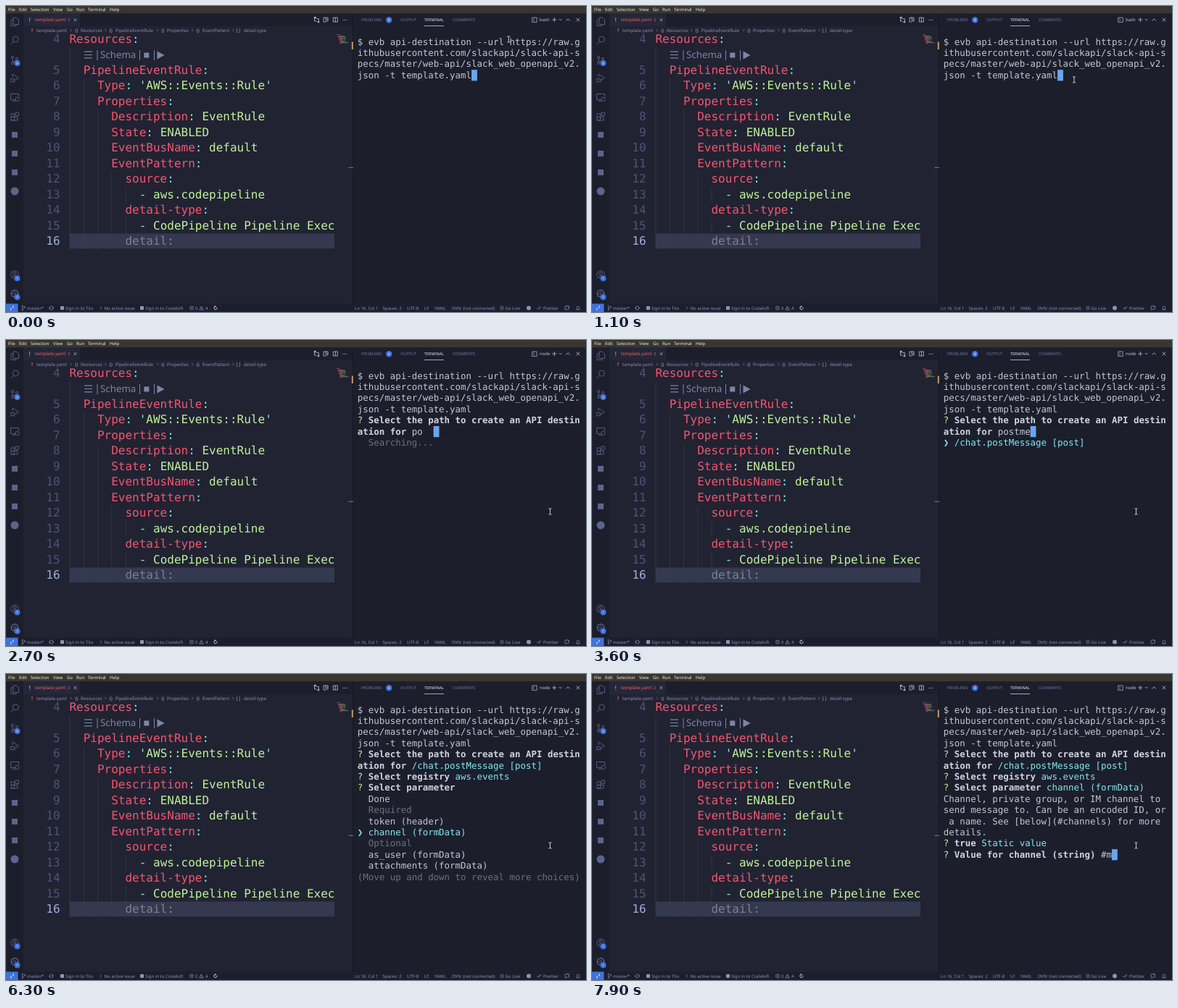
Recreate the animation shown at these times as an HTML page. Size 800 px wide and 423 px high, loop 8 s.

```html
<!DOCTYPE html>
<html lang="en">
<head>
<meta charset="utf-8">
<title>Editor and terminal</title>
<style>
  html, body { margin: 0; width: 100%; height: 100%; overflow: hidden; background: #212332; }
  svg { display: block; width: 800px; height: 423px; }
  /* the tiny turn keeps baselines from snapping to whole pixels */
  text { white-space: pre; text-rendering: geometricPrecision; transform: rotate(0.001deg); font-family: "Noto Sans", "Open Sans", sans-serif; }
  .mono { font-family: "DejaVu Sans Mono", "Liberation Mono", monospace; }
</style>
</head>
<body>
<svg id="stage" viewBox="0 0 800 423" xmlns="http://www.w3.org/2000/svg">
  <g id="chrome"></g>
  <g id="term"></g>
  <text id="shell" x="736" y="21.3" font-size="6" fill="#c3c8d8"></text>
  <path id="mouse" d="M-2 -4.2Q0 -4.2 0 -3Q0 -4.2 2 -4.2M0 -3V3M-2 4.2Q0 4.2 0 3Q0 4.2 2 4.2" fill="none" stroke="#dedee2" stroke-width="0.9"/>
</svg>
<script>
const $ = id => document.getElementById(id);
const DIM = '#5b648b', LIGHT = '#bcc3d8', BLUE = '#3e73dd', RED = '#f6546f', CYAN = '#80e9ee', GREEN = '#bff29a';
const WARN = '#ec655c';

const rect = (x, y, w, h, fill) =>
  `<rect x="${x}" y="${y}" width="${w}" height="${h}" fill="${fill}"/>`;
const dot = (x, y, r, fill) => `<circle cx="${x}" cy="${y}" r="${r}" fill="${fill}"/>`;
const line = (d, color = DIM, w = 0.9) =>
  `<path d="${d}" fill="none" stroke="${color}" stroke-width="${w}" stroke-linejoin="round"/>`;
const ring = (x, y, r, color = DIM, w = 0.9) =>
  `<circle cx="${x}" cy="${y}" r="${r}" fill="none" stroke="${color}" stroke-width="${w}"/>`;
const label = (x, y, s, fill = LIGHT, size = 6, extra = '') =>
  `<text x="${x}" y="${y}" font-size="${size}" fill="${fill}" ${extra}>${s}</text>`;
const span = (s, fill, bold) =>
  `<tspan fill="${fill}"${bold ? ' font-weight="700"' : ''}>${s}</tspan>`;
const labels = (y, fill, size, items) => items.map(([x, s]) => label(x, y, s, fill, size)).join('');

function frame() {
  return rect(0, 0, 800, 423, '#212332') +
    rect(0, 10, 800, 18, '#1c1e2c') + rect(24, 10, 78, 18, '#24273a') +
    rect(0, 10, 24, 402, '#1c1e2c') + rect(479, 10, 321, 402, '#1c1e2c') +
    rect(478, 10, 1, 402, '#151722') +
    rect(0, 411.5, 800, 11.5, '#1b1e2d') +
    rect(0, 0, 800, 10.2, '#393632');
}

function menu() {
  return labels(7.4, '#f0eeea', 6, [[3, 'File'], [18, 'Edit'], [34, 'Selection'], [65, 'View'],
    [84, 'Go'], [97, 'Run'], [113, 'Terminal'], [143, 'Help']]);
}

function tabs() {
  const crumb = '#8b92b2';
  const bracket = x => label(x, 35.8, '{}', '#a2a9c6', 6.2);
  const arrow = x => line(`M${x} 31.8l1.6 1.7l-1.6 1.7`, crumb, 0.6);
  return label(31.5, 22, '!', WARN, 8, 'font-weight="700"') + label(40, 21.4, 'template.yaml', WARN, 6.25) +
    label(85, 21.4, '2', WARN, 5.5) + line('M93.7 17.3l3.6 3.6m0-3.6l-3.6 3.6', '#c9cee0', 0.7) +
    label(35, 36, '!', WARN, 7, 'font-weight="700"') +
    labels(35.8, crumb, 6.2, [[42, 'template.yaml'], [103, 'Resources'], [151, 'PipelineEventRule'],
      [222, 'Properties'], [271, 'EventPattern'], [328, 'detail-type']]) +
    [95, 142.5, 214, 262.5].map(bracket).join('') + label(317.5, 35.8, '[ ]', '#a2a9c6', 6.2) +
    [89, 136.5, 208.5, 256.5, 312.5].map(arrow).join('') +
    line('M427 16h-1.5v5h3M429.5 22.5h1.8v-5h-3M428 15l-1.5 1.2l1.5 1.2', LIGHT, 0.8) +
    ring(426, 16, 1, LIGHT, 0.8) + ring(431, 22, 1, LIGHT, 0.8) +
    line('M438 16h6v3M438 16v6h3M441 16v3', LIGHT, 0.8) + ring(442.7, 20, 1.4, LIGHT, 0.8) +
    line('M451.3 16h6v6h-6zM454.3 16v6', LIGHT, 0.8) +
    [465, 467.3, 469.6].map(x => dot(x, 19.3, 0.6, LIGHT)).join('');
}

function sidebar() {
  const badge = (x, y, s) => dot(x, y, 4, BLUE) + label(x, y + 1.7, s, '#fff', 4.8, 'text-anchor="middle"');
  return line('M10 16h4.5l3 3v6.5H10zM10 19H7v8.5h7v-2') +
    ring(13.3, 46, 4) + line('M10.4 49l-4 4.3') +
    ring(9, 71, 1.6) + ring(9, 79, 1.6) + ring(15, 73, 1.6) + line('M9 72.6v4.8M15 74.6q0 2-6 2') + badge(15.5, 79, '9') +
    line('M9 98v-4l8.5 5.5l-6 4') + ring(9, 102.5, 2.4) + line('M5.5 100.5l1.4 1m-1.4 4l1.4-1m5.6-4l-1.4 1m1.4 4l-1.4-1') +
    line('M13 129.5H6.5v-8h11v4M9 131.5h4') + ring(15.6, 129, 2.7) +
    line('M7 149h4.5v9H7zM7 153.5h9v4.5h-9M13 147h4.5v4.5H13z') +
    rect(8, 174, 8, 8, DIM) + rect(8, 200, 8, 8, DIM) + rect(8, 226, 8, 8, DIM) + dot(12, 256, 5.5, DIM) +
    ring(12, 371.5, 5.3) + ring(12, 370, 1.9) + line('M8.5 375q3.5-4 7 0') + badge(15.5, 376.5, '1') +
    ring(12, 397.5, 4.6, DIM, 1.3) + ring(12, 397.5, 1.6) +
    line('M12 391.5v2.5M12 401v2.5M6 397.5h2.5M15.5 397.5h2.5M7.8 393.3l1.6 1.6M16.2 393.3l-1.6 1.6M7.8 401.7l1.6-1.6') +
    badge(15.5, 402.5, '1');
}

// number, indent, key, value
const CODE = [
  [4, 0, 'Resources'], null,
  [5, 2, 'PipelineEventRule'], [6, 4, 'Type', "'AWS::Events::Rule'"], [7, 4, 'Properties'],
  [8, 6, 'Description', 'EventRule'], [9, 6, 'State', 'ENABLED'], [10, 6, 'EventBusName', 'default'],
  [11, 6, 'EventPattern'], [12, 8, 'source'], [13, 10, '-', 'aws.codepipeline'],
  [14, 8, 'detail-type'], [15, 10, '-', 'CodePipeline Pipeline Exec'], [16, 8, 'detail']
];

function editor() {
  const left = 87.4, cw = 9.632, base = 50.9, pitch = 21.5;
  let out = rect(88, 314.5, 365, 20.8, '#343950');
  for (const [col, from] of [[0, 1], [2, 3], [4, 5], [6, 9]])
    out += rect(left + col * cw + 0.3, 35.4 + from * pitch, 0.7, (14 - from) * pitch, '#393d50');
  for (const r of [10, 12]) out += rect(left + 8 * cw + 0.3, 35.4 + r * pitch, 0.7, pitch, '#393d50');
  CODE.forEach((row, i) => {
    if (!row) return;
    const [num, indent, key, value = ''] = row, y = base + i * pitch, ghost = num === 16;
    out += label(74.6, y, num, ghost ? '#9fb0de' : '#4d5476', 16, 'class="mono" text-anchor="end"');
    const parts = ghost ? span(key + ':', '#7d818c')
      : (key === '-' ? span('-', CYAN) : span(key, RED) + span(':', CYAN)) +
        (value && ' ' + value.replace(/'|[^']+/g, s => span(s, s === "'" ? CYAN : GREEN)));
    out += label(left + indent * cw, y, parts, GREEN, 16, 'class="mono"');
  });
  const lens = '#7c84a8';
  out += line('M108 63.2h11M108 67.5h11M108 71.8h11', lens, 1.2) + label(130, 72, 'Schema', lens, 13.3) +
    [125.5, 184, 204].map(x => rect(x, 61, 1, 14, lens)).join('') + rect(190.3, 64.5, 7, 7, lens) +
    `<path d="M208.5 62.5L218.5 68L208.5 73.5Z" fill="${lens}"/>`;
  CODE.forEach((row, i) => {
    if (!row) return;
    const [, indent, key, value = ''] = row, x = 456 + indent * 0.5, w = key.length * 0.5;
    out += rect(x, 39 + i * 0.95, w, 0.7, '#b24e62') + rect(x + w + 0.5, 39 + i * 0.95, value.length * 0.4, 0.7, '#8aa873');
  });
  return out + rect(476.8, 49.5, 2, 10.5, '#bb9d6a') + rect(472.5, 222.8, 6.5, 1, '#7a7f92');
}

function panel() {
  return labels(21.2, '#727a9c', 5.5, [[490, 'PROBLEMS'], [544, 'OUTPUT'], [616, 'COMMENTS']]) +
    label(577, 21.2, 'TERMINAL', '#e2e6f4', 5.5) + rect(577, 27.2, 27, 0.8, '#c4cbe0') +
    dot(528.2, 19.3, 4.2, BLUE) + label(528.2, 21.2, '4', '#fff', 5.2, 'text-anchor="middle"') +
    line('M725.8 16h6.4v6.4h-6.4zM727.3 17.7l1.6 1.5l-1.6 1.5', LIGHT, 0.7) +
    line('M753.3 19h6M756.3 16v6M763 18l1.7 1.8l1.7-1.8M772.5 20.5l2.7-2.8l2.7 2.8M786.5 16.5l4.8 4.8m0-4.8l-4.8 4.8', LIGHT, 0.8);
}

function status() {
  const c = '#8d94b2';
  return rect(0, 411.5, 16.5, 11.5, BLUE) + line('M6 417.5l2 1.5l-2 1.5M11 414.5l-2 1.5l2 1.5', '#fff', 0.8) +
    ring(22.7, 415, 0.9, c, 0.6) + ring(22.7, 420, 0.9, c, 0.6) + ring(26, 416, 0.9, c, 0.6) +
    line('M22.7 416v3M26 417q0 1.3-3 1.3', c, 0.6) +
    ring(62.5, 417.5, 2.5, c, 0.7) + line('M59 418.5l1.2-1.5l1.2 1.5M63.8 416.5l1.2 1.5l1.2-1.5', c, 0.6) +
    rect(75, 415, 5, 5, c) + rect(185, 415, 5, 5, c) + line('M130 415.5l1.8 2l-1.8 2', c, 0.7) +
    labels(419.7, c, 6, [[29, 'master*'], [82, 'Sign in to Tilo'], [135.5, 'No active issue'],
      [192, 'Sign in to Crateloft'], [261, '0'], [275, '4'], [481, 'Ln 16, Col 1'], [519.5, 'Spaces: 2'],
      [553, 'UTF-8'], [577, 'LF'], [591, 'YAML'], [614.5, 'OVN: (not connected)'], [688.5, 'Go Live'], [741, 'Prettier']]) +
    ring(256, 417.5, 2.5, c, 0.7) + line('M254.9 416.4l2.2 2.2m0-2.2l-2.2 2.2', c, 0.6) +
    line('M269.5 415l2.8 5h-5.6zM269.5 416.7v1.8', c, 0.7) +
    line('M290.8 416.6a2.1 2.1 0 1 1-1.8-1.2M288.3 414.2l1.2 1.2l-1.2 1.2', '#fff', 0.7) +
    ring(684, 417.5, 2.4, c, 0.6) + dot(684, 417.5, 0.8, c) + dot(721, 417.5, 3, c) +
    line('M732 417.7l1.4 1.5l3-3.5M735 419.2l3-3.5', c, 0.7) +
    line('M771 415h5.5v4h-3l-1.3 1.5v-1.5h-1.2zM774 413.7l2.7 2.7', c, 0.7) +
    line('M786.5 419.5h5l-.8-1.2v-1.5a1.7 1.7 0 0 0-3.4 0v1.5zM788.5 420.7h1', c, 0.7);
}

// Each segment starts with its style: w plain, b bold, g green, c cyan, d dim
const STYLE = { w: '#c2c7d2', b: '#cfd4df', g: GREEN, c: CYAN, d: '#6c707c' };
const COMMAND = ['w$ evb api-destination --url https://raw.g', 'withubusercontent.com/slackapi/slack-api-s',
  'wpecs/master/web-api/slack_web_openapi_v2.', 'wjson -t template.yaml'];
const ask = (q, answer = '') => `g?|b ${q} ${answer && '|' + answer}`;
const PATH = [...COMMAND, ask('Select the path to create an API destin').trimEnd()];
const CHOSEN = [...PATH, 'bation for |c/chat.postMessage [post]'];
const REGISTRY = [...CHOSEN, ask('Select registry', 'caws.events')];
const CHANNEL = [...REGISTRY, ask('Select parameter', 'cchannel (formData)'),
  'wChannel, private group, or IM channel to', 'wsend message to. Can be an encoded ID, or',
  'w a name. See [below](#channels) for more', 'wdetails.'];
const OPTIONS = ['Done', '-Required', 'token (header)', 'channel (formData)', '-Optional',
  'as_user (formData)', 'attachments (formData)'];

const search = (typed, found) => [...PATH, 'bation for |w' + typed, found ? 'c❯ /chat.postMessage [post]' : 'd  Searching...'];
const params = picked => [...REGISTRY, ask('Select parameter'),
  ...OPTIONS.map((o, i) => o[0] === '-' ? 'd  ' + o.slice(1) : i === picked ? 'c❯ ' + o : 'w  ' + o),
  'd(Move up and down to reveal more choices)'];
const value = typed => [...CHANNEL, ask('true', 'cStatic value'), ask('Value for channel (string)', 'w' + typed)];

// start time, lines, cursor column, cursor row
const STEPS = [
  [0, COMMAND, 21, 3],
  [1500, COMMAND, 0, 4],
  [2000, search(''), 12, 5],
  [2500, search('p'), 13, 5],
  [2700, search('po'), 14, 5],
  [2900, search('pos'), 13, 5],
  [3000, search('post'), 14, 5],
  [3300, search('postm', true), 15, 5],
  [3500, search('postme', true), 16, 5],
  [3900, CHOSEN, 0, 6],
  [4300, [...CHOSEN, ask('Select registry'), 'c❯ aws.events']],
  [4900, REGISTRY, 0, 7],
  [5300, params(0)],
  [5800, params(2)],
  [6100, params(3)],
  [6700, [...CHANNEL, ask('true'), 'c❯ Static value']],
  [7300, value(''), 29, 13],
  [7600, value('#'), 30, 13],
  [7800, value('#m'), 31, 13]
];

function terminal([, rows, col, row]) {
  const x = 484.8, top = 42, pitch = 15.4, cw = 7.49;
  const cursor = col === undefined ? '' : rect(x + col * cw, top + row * pitch, 7.8, 15.2, '#6aa5ee');
  return cursor + rows.map((r, i) => label(x, top + 11.6 + i * pitch,
    r.split('|').map(s => span(s.slice(1), STYLE[s[0]], s[0] === 'b')).join(''), STYLE.w, 12.44, 'class="mono"')).join('');
}

const ease = (t, a, b) => {
  const p = Math.min(1, Math.max(0, (t - a) / (b - a)));
  return p * p * (3 - 2 * p);
};

let shown;
function draw(now) {
  const t = Math.floor(now % 8000 / 100) * 100;
  const step = STEPS.filter(s => s[0] <= t).pop();
  if (step !== shown) {
    shown = step;
    $('term').innerHTML = terminal(step);
    $('shell').textContent = t < 1500 ? 'bash' : 'node';
  }
  const a = ease(t, 200, 900), b = ease(t, 1300, 1900);
  $('mouse').setAttribute('transform', `translate(${693.3 - 28.3 * a + 85.5 * b} ${46 + 56 * a + 135 * b})`);
}

$('chrome').innerHTML = frame() + menu() + tabs() + sidebar() + editor() + panel() + status();
const start = performance.now();
function tick() {
  draw(performance.now() - start);
  requestAnimationFrame(tick);
}
tick();
</script>
</body>
</html>
```
